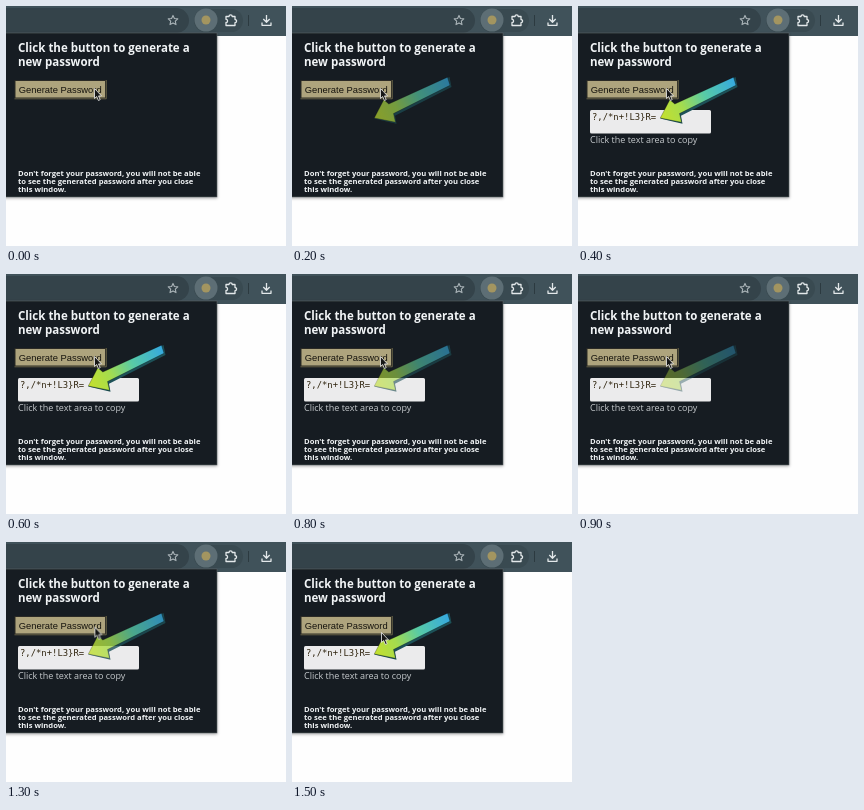
Animation of 280x240 px, one loop 1600 ms. Source, as an HTML page:

```html
<!DOCTYPE html>
<html lang="en">
<head>
<meta charset="utf-8">
<title>Password generator popup</title>
<style>
  html, body { margin: 0; width: 100%; height: 100%; overflow: hidden; background: #fefefe; }
  svg { display: block; width: 280px; height: 240px; }
  text { font-family: "Open Sans", "Noto Sans", sans-serif; fill: #f1f4f6; }
  .title { font-size: 11.5px; font-weight: 700; }
  .note { font-size: 7.65px; font-weight: 700; }
  .hint { font-size: 9px; fill: #c6cacd; }
  .label { font: 9.4px "Liberation Sans", Arial, sans-serif; fill: #15130d; }
  .code { font: 8.9px "DejaVu Sans Mono", monospace; fill: #30250f; }
  .icon { fill: none; stroke: #e3e8ea; stroke-width: 1.3; stroke-linejoin: round; }

  .output, .arrow, .cursor { animation: 1.6s infinite; }
  .output { animation-name: reveal; animation-timing-function: step-end; }
  .arrow { animation-name: pulse; }
  .cursor { animation-name: leave; }

  @keyframes reveal {
    0% { opacity: 0; }
    18.75%, 100% { opacity: 1; }
  }
  @keyframes pulse {
    0% { opacity: 0; animation-timing-function: steps(3); }
    18.75% { opacity: 1; }
    37.5% { opacity: 1; animation-timing-function: steps(4); }
    62.5% { opacity: .2; animation-timing-function: steps(4); }
    87.5%, 100% { opacity: 1; }
  }
  @keyframes leave {
    0%, 75% { transform: none; animation-timing-function: steps(3); }
    93.75%, 100% { transform: translate(1px, 8px); }
  }
</style>
</head>
<body>
<svg viewBox="0 0 280 240">
  <defs>
    <linearGradient id="ramp" gradientUnits="userSpaceOnUse" x1="82" y1="112" x2="157" y2="76">
      <stop offset="0" stop-color="#c6e02c"/>
      <stop offset=".3" stop-color="#a4dc4e"/>
      <stop offset=".6" stop-color="#58cba6"/>
      <stop offset="1" stop-color="#36a9de"/>
    </linearGradient>
    <filter id="shade" x="-10%" y="-10%" width="120%" height="120%">
      <feDropShadow dx="0" dy="1" stdDeviation="1.5" flood-opacity=".35"/>
    </filter>
  </defs>

  <!-- toolbar -->
  <rect width="280" height="30" fill="#40525a"/>
  <rect x="-20" y="2" width="203" height="25" rx="12.5" fill="#34434a"/>
  <rect x="188" y="3" width="49" height="23" rx="11.5" fill="#394a51"/>
  <circle cx="200" cy="14" r="11.5" fill="#5d6e75"/>
  <circle cx="200" cy="14" r="4.5" fill="#a39560"/>
  <path class="icon" style="stroke: #aab4b8; stroke-width: 1.1" d="M167 9.4l1.4 3.1 3.4.4-2.5 2.3.7 3.4-3-1.7-3 1.7.7-3.4-2.5-2.3 3.4-.4z"/>
  <path class="icon" d="M220 10.5h3a1.6 1.6 0 0 1 3.2 0h2.8v3a1.6 1.6 0 0 1 0 3.2v2.8h-9v-3a1.6 1.6 0 0 0 0-3.2z"/>
  <path d="M242.5 9v11" stroke="#2c3a40"/>
  <path class="icon" d="M260.5 9v7m-3.2-3l3.2 3.2 3.2-3.2M256 16.5v2.8h9v-2.8"/>

  <!-- popup -->
  <rect x="-5" y="27" width="216" height="164" fill="#181c21" stroke="#5c6266" stroke-width=".6" filter="url(#shade)"/>
  <text class="title" x="12" y="46">Click the button to generate a</text>
  <text class="title" x="12" y="60">new password</text>
  <rect x="9" y="74.5" width="90.5" height="17.5" fill="#aea47d" stroke="#2b2a25"/>
  <path d="M8.5 92.8h91.800V74" fill="none" stroke="#77704f" stroke-width=".8"/>
  <text class="label" x="12.8" y="86.500">Generate Password</text>

  <g class="output">
    <rect x="12" y="104" width="121" height="23.5" rx="1.5" fill="#ebebec"/>
    <text class="code" x="14" y="113.800">?,/*n+!L3}R=</text>
    <text class="hint" x="12" y="137">Click the text area to copy</text>
  </g>

  <text class="note" x="12" y="169.5">Don't forget your password, you will not be able</text>
  <text class="note" x="12" y="178">to see the generated password after you close</text>
  <text class="note" x="12" y="186.3">this window.</text>

  <g class="arrow">
    <path fill="#1d5158" d="M82 112.500L104.500 117.800 103 109.800 159.500 81 157.500 71z"/>
    <path fill="url(#ramp)" stroke="#000" stroke-opacity=".4" stroke-width=".7" d="M82.300 112L91.800 93.800 96.800 98 155.500 71.200 158 79.300 101.500 107.500 103.500 116.300z"/>
  </g>
  <path class="cursor" fill="#161616" stroke="#eee" stroke-width=".8" d="M88.500 82.500v10l2.200-2 1.700 4 1.800-.8-1.700-3.800h3z"/>
</svg>
</body>
</html>
```
